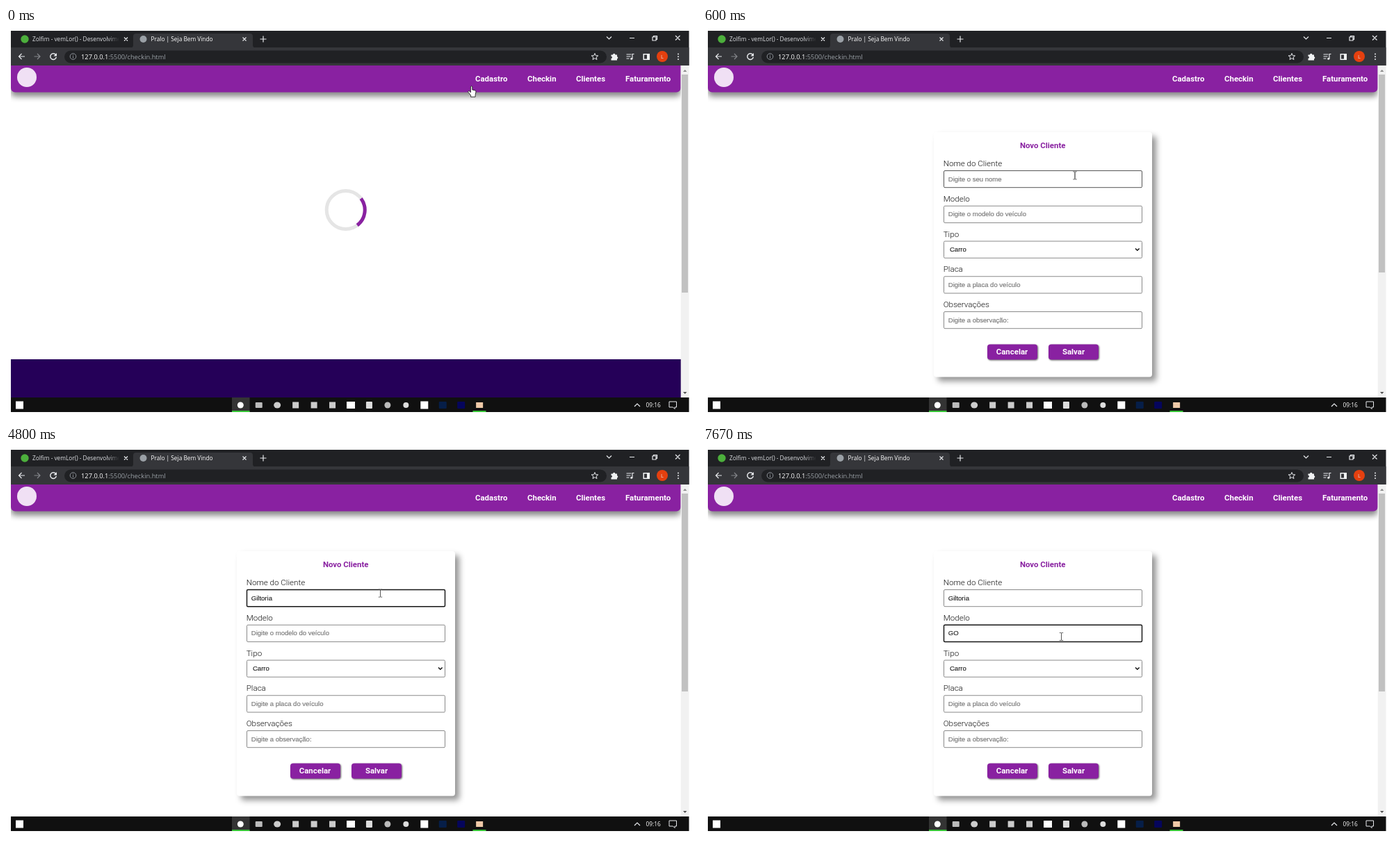
These frames come from a looping animation (994x563 px, 8000 ms). An HTML page:

```html
<!DOCTYPE html>
<html lang="pt-BR">
<head>
<meta charset="utf-8">
<title>Checkin</title>
<style>
  html, body { margin: 0; width: 100%; height: 100%; overflow: hidden; background: #fff; }
  svg { display: block; width: 994px; height: 563px; }
  text { white-space: pre; }
  .ui { font: 8.3px "Open Sans", "Noto Sans", sans-serif; fill: #dfe1e5; }
  .bold { font: 700 11.43px Roboto, sans-serif; fill: #fff; }
  .mid { text-anchor: middle; }
  .label { font: 300 11.6px Roboto, sans-serif; fill: #111; }
  .field { font: 9.52px "Liberation Sans", Arial, sans-serif; fill: #757575; stroke: #757575; stroke-width: .15; }
  .typed { fill: #222; stroke: #222; }
  .box { fill: #fff; stroke: #8a8a8a; stroke-width: 1; }
  .box.hover { stroke: #555; }
  .box.focus { stroke: #151515; stroke-width: 1.45; }
  .line { fill: none; stroke: #e8eaed; stroke-width: 1.2; }
  .nav { filter: drop-shadow(0 6px 4.5px rgba(0,0,0,.48)); }
  .card { filter: drop-shadow(6px 6px 4.2px rgba(0,0,0,.42)); }
  .btn { fill: #8921a1; filter: drop-shadow(1.5px 1.5px 1.2px rgba(0,0,0,.6)); }
</style>
</head>
<body>
<svg viewBox="0 0 994 563">
  <defs>
    <clipPath id="page"><rect x="7" y="54" width="964" height="478"/></clipPath>
    <linearGradient id="fade"><stop offset="0" stop-color="#202124" stop-opacity="0"/><stop offset="1" stop-color="#202124"/></linearGradient>
  </defs>

  <!-- browser chrome -->
  <rect x="7" y="4" width="975.5" height="50" fill="#202124"/>
  <path d="M179 28.5q4 0 4-4V12q0-4 4-4H351q4 0 4 4v12.500q0 4 4 4z" fill="#35363a"/>
  <rect x="7" y="28" width="975.5" height="26" fill="#35363a"/>
  <rect x="84" y="32.500" width="780" height="18" rx="9" fill="#202124"/>
  <circle cx="27" cy="16" r="5.700" fill="#4caf3c"/>
  <text class="ui" x="38" y="19">Zolfim - vemLor() - Desenvolvimento</text>
  <rect x="146" y="9" width="17" height="14" fill="url(#fade)"/>
  <rect x="163" y="9" width="18" height="14" fill="#202124"/>
  <circle cx="197.500" cy="16" r="5" fill="#9aa0a6"/>
  <text class="ui" x="208.500" y="19" style="fill:#fff">Pralo | Seja Bem Vindo</text>
  <path class="line" d="M170 13.500l5 5m0-5l-5 5M340.500 13.500l5 5m0-5l-5 5M370 11.500v9m-4.500-4.500h9"/>
  <path class="line" d="M864 12.500l3.500 3.500 3.500-3.500M897 14.500h7M930 13h5v5h-5zM931.500 13v-1.500h5v5H935M963 11l6.500 6.500m0-6.500l-6.500 6.500"/>
  <path class="line" d="M27 41h-8.500m4-4l-4 4 4 4"/>
  <path class="line" style="stroke:#85878b" d="M40.500 41h8.500m-4-4l4 4-4 4"/>
  <path class="line" style="stroke-width:1.500" d="M71.500 38.500a4.300 4.300 0 1 0 .8 3.300"/>
  <path d="M73 36v4.500h-4.500z" fill="#e8eaed"/>
  <path class="line" style="stroke:#9aa0a6;stroke-width:.9" d="M92.200 41a4.300 4.300 0 1 0 8.600 0a4.300 4.300 0 1 0-8.600 0M96.500 40.500v3M96.500 38.300v1.100"/>
  <text class="ui" x="108" y="44.500" style="font-size:9.300px;fill:#9aa0a6"><tspan fill="#fff">127.0.0.1</tspan>:5500/checkin.html</text>
  <path class="line" style="stroke-width:1" d="M847 36.500l1.300 3.200 3.500.2-2.700 2.200.9 3.400-3-1.900-3 1.900.9-3.400-2.700-2.200 3.500-.2z"/>
  <path d="M870.500 38.500h2.500a1.700 1.700 0 0 1 3.400 0h2.600v2.700a1.700 1.700 0 0 1 0 3.300v2h-8.500v-2.700a1.500 1.500 0 0 0 0-3z" fill="#f1f3f4"/>
  <path class="line" d="M892.500 38h7M892.500 41h6M892.500 44h4M901 44.500V37.500h2.500"/>
  <circle cx="899.700" cy="44.200" r="1.500" fill="#e8eaed"/>
  <path d="M916.500 37h9.500v9h-9.500zM918 38.500v6h4v-6z" fill="#f1f3f4" fill-rule="evenodd"/>
  <circle cx="944" cy="41" r="8" fill="#e5400f"/>
  <text class="ui mid" x="944" y="43.800" style="font-size:7.500px">L</text>
  <g fill="#e8eaed"><circle cx="967" cy="37.500" r="1"/><circle cx="967" cy="41.200" r="1"/><circle cx="967" cy="45" r="1"/></g>

  <!-- page -->
  <g clip-path="url(#page)">
    <g id="loading">
      <rect x="7" y="477" width="964" height="55" fill="#250058"/>
      <circle cx="488.700" cy="262" r="27.500" fill="none" stroke="#e5e5e5" stroke-width="5"/>
      <path id="arc" d="M508.150 242.550a27.500 27.500 0 0 1 0 38.900" fill="none" stroke="#8921a1" stroke-width="5"/>
    </g>
    <rect class="nav" x="7" y="44" width="963.500" height="48.500" rx="6" fill="#8921a1"/>
    <circle cx="30" cy="71" r="14" fill="#f0e0f4"/>
    <text class="bold" x="675" y="77.200">Cadastro</text>
    <text class="bold" x="750" y="77.200">Checkin</text>
    <text class="bold" x="820" y="77.200">Clientes</text>
    <text class="bold" x="891" y="77.200">Faturamento</text>
    <g id="form">
      <rect class="card" x="332" y="150" width="314" height="352.500" rx="4" fill="#fff"/>
      <text class="bold mid" x="488.700" y="173.200" style="fill:#8921a1">Novo Cliente</text>
      <g id="fields"></g>
      <path d="M622 317.500l2.800 2.800 2.800-2.800" fill="none" stroke="#111" stroke-width="1.500"/>
      <rect class="btn" x="409" y="455.500" width="72" height="22" rx="4"/>
      <rect class="btn" x="497" y="455.500" width="72" height="22" rx="4"/>
      <text class="bold mid" x="444.500" y="469.700">Cancelar</text>
      <text class="bold mid" x="533" y="469.700">Salvar</text>
      <rect id="caret" width="1" height="11.500" fill="#111"/>
    </g>
  </g>
  <rect x="970.700" y="54" width="11.800" height="478" fill="#f1f1f1"/>
  <rect id="thumb" x="972" y="67" width="9" fill="#c1c1c1"/>
  <path d="M974 63l2.700-3 2.700 3z" fill="#8a8a8a"/>
  <path d="M974 524l2.700 3 2.700-3z" fill="#505050"/>

  <!-- taskbar -->
  <rect x="7" y="532" width="975.500" height="21" fill="#101010"/>
  <rect x="325" y="532" width="25.500" height="21" fill="#343434"/>
  <path d="M325 552h25.500M671.500 552h19" stroke="#35c435" stroke-width="2"/>
  <rect x="14" y="537.500" width="11" height="11" fill="#fff"/>
  <g id="apps"></g>
  <path class="line" d="M904 545l4-4 4 4"/>
  <text class="ui" x="920.500" y="545.700" style="fill:#fff">09:16</text>
  <path class="line" style="stroke-width:1" d="M954 538h10.500v8h-2.500v2.500l-2.500-2.500H954z"/>

  <!-- pointers, hot spot at the origin -->
  <path id="hand" d="M-1.200-7q0-1.300 1.200-1.300t1.200 1.300v4l4 .9q1.400.4 1.200 2L5.500 4.500v2.700h-6.500V5L-4.600.4q-.8-1.200.3-1.600 1-.3 1.900.7l1.200 1.300z" fill="#fff" stroke="#222" stroke-width=".9"/>
  <path id="arrow" d="M0 0v11.500l2.700-2.500 1.800 4.100 1.800-.8-1.800-4h3.700z" fill="#fff" stroke="#111" stroke-width=".8"/>
  <path id="beam" d="M-2.700-5.500h2q.7 0 .7.700V4.800q0 .7-.7.700h-2M2.700-5.500h-2q-.7 0-.7.700V4.800q0 .7.700.7h2" fill="none" stroke="#555" stroke-width=".9"/>
</svg>
<script>
const LOOP = 8000, FRAME = 1000 / 15, FORM_AT = 200;
const $ = id => document.getElementById(id);

function add(parent, tag, attrs, text = "") {
  const el = document.createElementNS("http://www.w3.org/2000/svg", tag);
  for (const k in attrs) el.setAttribute(k, attrs[k]);
  el.textContent = text;
  parent.append(el);
  return el;
}

const fields = [
  ["Nome do Cliente", "Digite o seu nome"],
  ["Modelo", "Digite o modelo do veículo"],
  ["Tipo", "Carro"],
  ["Placa", "Digite a placa do veículo"],
  ["Observações", "Digite a observação:"]
].map(([label, hint], i) => {
  const y = 205.5 + i * 50.75, select = i === 2;
  add($("fields"), "text", { class: "label", x: 345.7, y: y - 6.4 }, label);
  return {
    y, hint,
    box: add($("fields"), "rect", { class: "box", x: 346.5, y, width: 285, height: 24.2, rx: 1.5 }),
    text: add($("fields"), "text", { class: select ? "field typed" : "field", x: select ? 355 : 352.8, y: y + 15.2 }, hint)
  };
});

// taskbar icons: colour, width, height, corner radius
[
  ["#fff", 9, 9, 5], ["#bbb", 10, 8, 1], ["#ccc", 10, 9, 5], ["#ccc", 9, 9, 0], ["#ccc", 9, 9, 0],
  ["#ccc", 9, 9, 0], ["#fff", 12, 10, 0], ["#ddd", 9, 10, 1], ["#bbb", 9, 9, 5], ["#ddd", 8, 8, 4],
  ["#fff", 11, 11, 0], ["#061e48", 11, 10, 1], ["#05055c", 11, 10, 1], ["#efc9a8", 10, 8, 0]
].forEach(([fill, width, height, rx], i) =>
  add($("apps"), "rect", { fill, width, height, rx, x: 337.3 + i * 26.45 - width / 2, y: 543 - height / 2 }));

// [time, field, number of letters typed]
const words = ["Giltoria", "GO"];
const keys = [
  [670, 0, 0], [2670, 0, 1], [3400, 0, 2], [3600, 0, 3], [3870, 0, 4], [3930, 0, 5],
  [4070, 0, 6], [4200, 0, 7], [4270, 0, 8],
  [5070, 1, 0], [6870, 1, 1], [7070, 1, 2], [7135, 1, 2]
];

// [time, x, y]
const path = [
  [0, 669.6, 92], [200, 668.8, 92], [600, 535, 212.4], [866, 535, 212.4], [867, 536, 211.5],
  [4733, 536, 211.5], [4800, 538.5, 210.6], [5067, 515.5, 273], [LOOP, 515.5, 273]
];

// quick start, slow arrival
function pointerAt(t) {
  const i = Math.max(1, path.findIndex(p => p[0] >= t));
  const [a, b] = [path[i - 1], path[i]];
  const u = (t - a[0]) / (b[0] - a[0]);
  const s = 1 - (1 - u) ** 2;
  return [a[1] + (b[1] - a[1]) * s, a[2] + (b[2] - a[2]) * s];
}

function drawPointer(t, ready) {
  const [x, y] = pointerAt(t);
  const over = ready && x > 346 && x < 632 && fields.some(f => y > f.y && y < f.y + 25);
  const kind = y < 93 ? "hand" : over ? "beam" : "arrow";
  for (const id of ["hand", "arrow", "beam"]) $(id).style.display = id === kind ? "" : "none";
  $(kind).setAttribute("transform", `translate(${x} ${y})`);
  return over && y < 231;
}

function draw(t) {
  const step = Math.floor((t + 4) / FRAME) * FRAME;
  const ready = t >= FORM_AT;
  $("loading").style.display = ready ? "none" : "";
  $("form").style.display = ready ? "" : "none";
  $("thumb").setAttribute("height", ready ? 285 : 314);
  $("arc").setAttribute("transform", `rotate(${8 + step * .36} 488.7 262)`);
  const hover = drawPointer(step, ready);

  const past = keys.filter(k => t >= k[0]);
  const [since, active] = past.at(-1) || [0, -1];
  fields.forEach((f, i) => {
    f.box.setAttribute("class", "box" + (i === active ? " focus" : i === 0 && hover ? " hover" : ""));
    if (i > 1) return;
    const count = past.reduce((n, k) => k[1] === i ? k[2] : n, 0);
    f.text.textContent = count ? words[i].slice(0, count) : f.hint;
    f.text.setAttribute("class", count ? "field typed" : "field");
    if (i !== active) return;
    $("caret").setAttribute("x", 353 + (count ? f.text.getComputedTextLength() : 0));
    $("caret").setAttribute("y", f.y + 6);
  });
  const lit = Math.floor((t - since + 7) / 533.33) % 2 === 0;
  $("caret").style.display = active >= 0 && lit ? "" : "none";
}

const start = performance.now();
function tick() {
  draw((performance.now() - start) % LOOP);
  requestAnimationFrame(tick);
}
tick();
</script>
</body>
</html>
```
